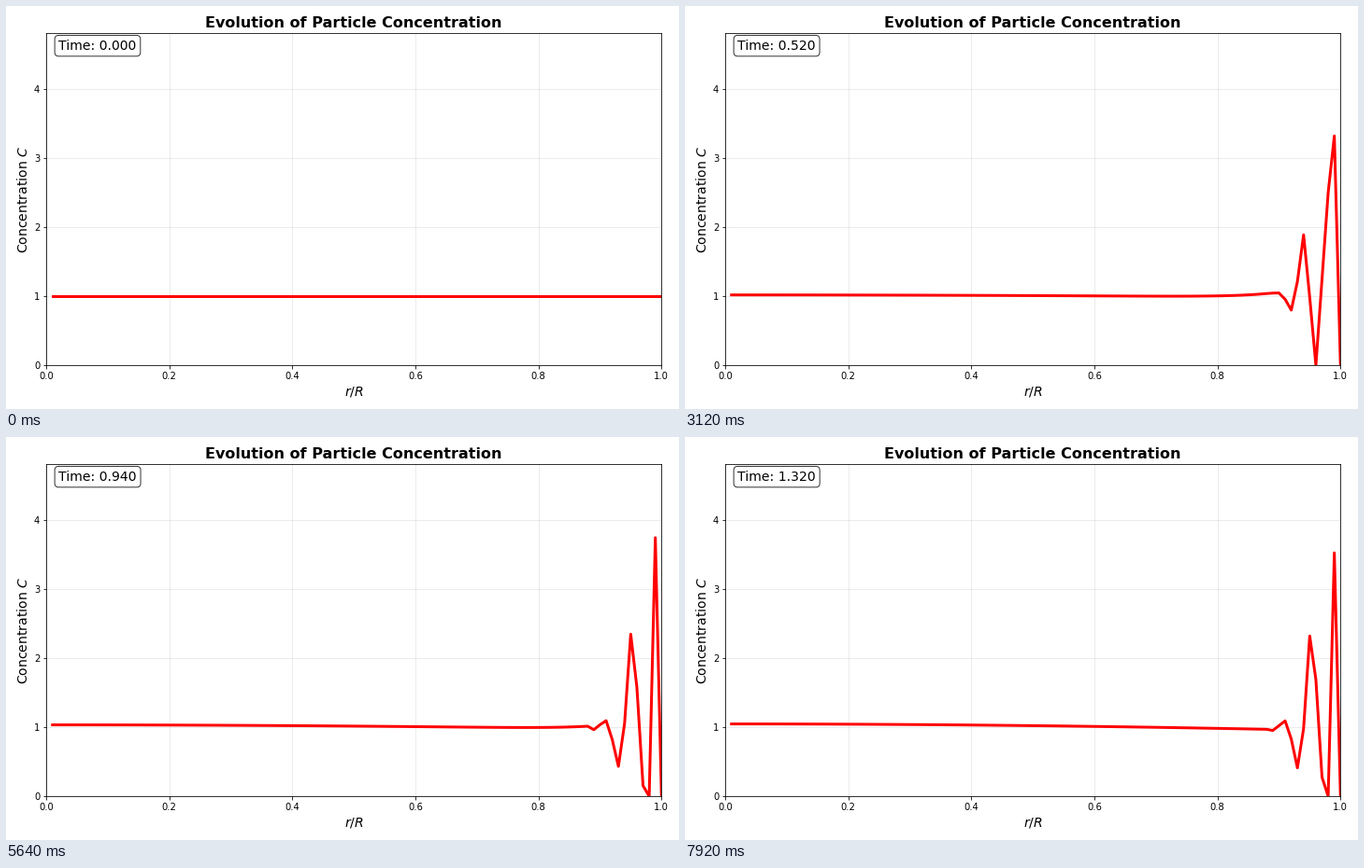
A matplotlib script for the animation above (8 s loop, 720 px wide and 432 px high).

```python
import numpy as np
import matplotlib.pyplot as plt
from matplotlib.animation import FuncAnimation

TICK_MS = 40
TICKS_PER_STEP = 3
TICKS = 200
DT = 0.02
CYCLE = 6

r = np.arange(1, 101) / 100
depth = np.arange(98, -2, -1)    # cells inwards from the node at r = 0.99
rippled = (depth >= 3) & (depth <= 10)


def core(t):
    """Slow drift of the smooth part: up at the centre, down outside."""
    return 1 + t * (0.036 - 0.076 * r**2)


def pile(t):
    """Material that gathers ahead of the wall, then drains."""
    phase = min(1, (t / 1.32)**0.85)
    return 0.37 * np.sin(np.pi * phase) * r**15.5


def shift(step):
    """Outward shift of the wave: a jump once per cycle, then relaxation."""
    p = (step - 2) % CYCLE
    return 1.45 * np.exp(-0.53 * p) - 0.45


def ripple(s):
    """Standing wave that fades with distance from the wall."""
    angle = np.radians(78 * (depth - 4) - 50 * s - 40 * s**2)
    return 2.85 * np.exp(-0.045 * depth**2) * np.cos(angle)


def concentration(step):
    t = step * DT
    smooth = core(t)
    c = smooth + pile(t)
    if step == 0:
        return c

    # The ripple spreads inwards from the wall
    s = shift(step)
    gain = np.clip((step + 4 - 2.9 * depth) / 12, 0, 1)
    wavy = c + (smooth + ripple(s) - c) * gain
    c = np.where(rippled, wavy, c)

    # The last cells share the mass held at the wall
    leak = 2.5 * max(0, s)**4
    c[96] = leak / 2 + max(0, -s)
    c[97] = leak
    c[98] = 4.02 + 1.8 * s - leak
    c[99] = 0
    return np.maximum(c, 0)


fig, ax = plt.subplots(figsize=(10, 6), dpi=72)
line, = ax.plot(r, np.ones_like(r), color="red", linewidth=3)
ax.set_xlim(0, 1)
ax.set_ylim(0, 4.81)
ax.set_title("Evolution of Particle Concentration", fontsize=16,
             fontweight="bold")
ax.set_xlabel("$r/R$", fontsize=14)
ax.set_ylabel("Concentration $C$", fontsize=14)
ax.grid(True, alpha=0.3)
clock = ax.text(0.02, 0.95, "Time: 0.000", transform=ax.transAxes,
                fontsize=14,
                bbox=dict(boxstyle="round", facecolor="white", alpha=0.8))
fig.tight_layout()


def update(tick):
    step = tick // TICKS_PER_STEP
    line.set_ydata(concentration(step))
    clock.set_text(f"Time: {step * DT:.3f}")
    return line, clock


anim = FuncAnimation(fig, update, frames=TICKS, interval=TICK_MS,
                     repeat=True, repeat_delay=0)
plt.show()
```
